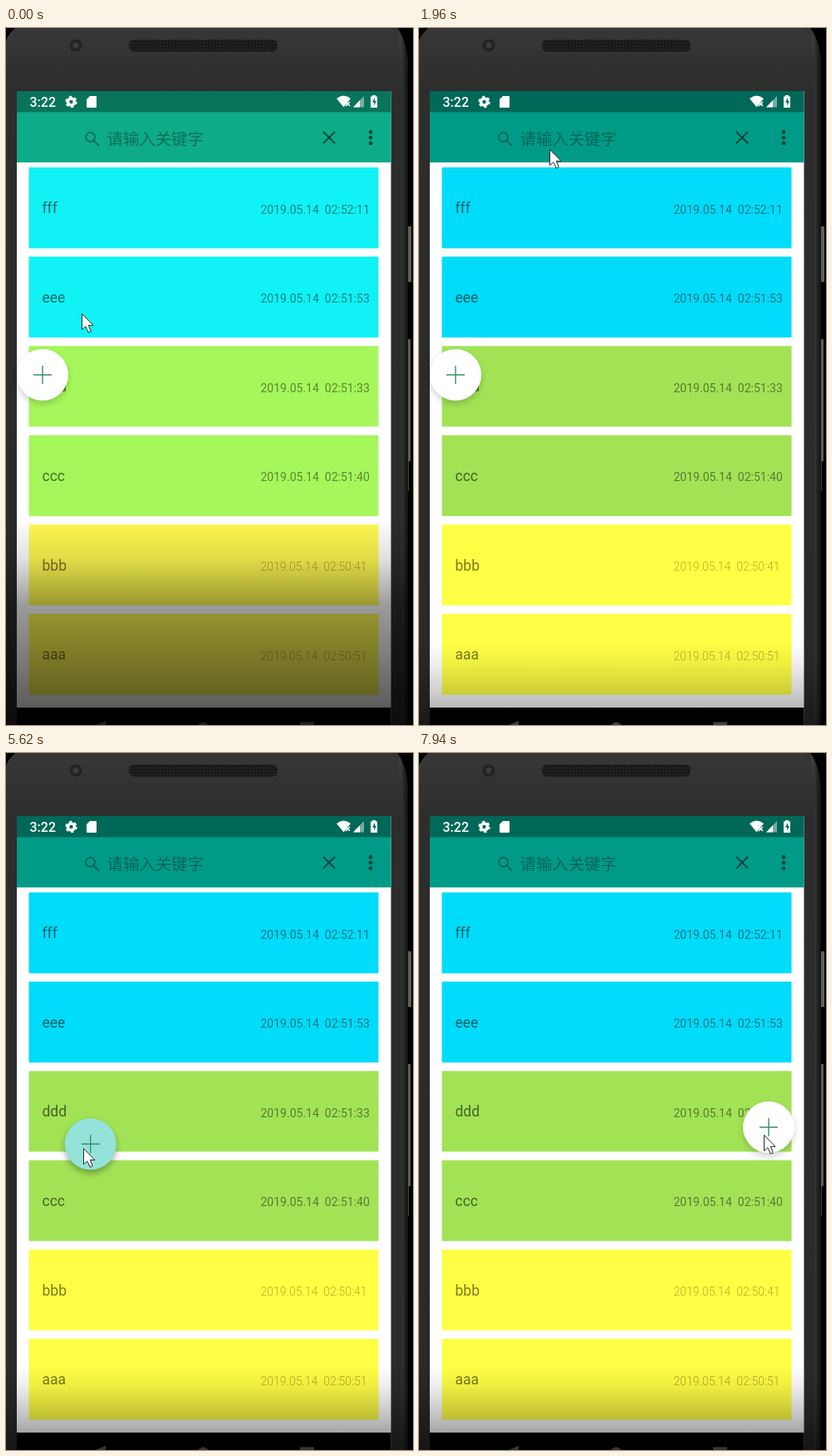
These frames come from a looping animation (490x840 px, 8 s). An HTML page:

```html
<!DOCTYPE html>
<html lang="zh">
<head>
<meta charset="utf-8">
<style>
html, body { margin: 0; width: 100%; height: 100%; overflow: hidden; background: #000; }
svg {
  display: block; width: 490px; height: 840px; font-family: Roboto, "Noto Sans CJK SC", "Noto Sans CJK", sans-serif;
  --status: #006858; --bar: #009b87; --cyan: #00dcf9; --green: #a2e356; --yellow: #ffff45;
}
svg.bright { --status: #08745a; --bar: #0eab88; --cyan: #10f2f5; --green: #a6f75b; --yellow: #fffa50; }
text { white-space: pre; }
.name { font-size: 17.5px; fill: rgba(0,0,0,.57); }
.date { font-size: 14px; fill: rgba(0,0,0,.46); }
.yellow ~ .name { fill: rgba(0,0,0,.52); }
.yellow ~ .date { fill: rgba(90,50,0,.42); font-weight: 300; }
.hint { font-size: 19.4px; fill: rgba(0,0,0,.35); font-family: "Noto Sans CJK SC", "Noto Sans CJK", sans-serif; }
.status { fill: var(--status); }
.bar { fill: var(--bar); }
.cyan { fill: var(--cyan); }
.green { fill: var(--green); }
.yellow { fill: var(--yellow); }
</style>
</head>
<body>
<svg id="stage" viewBox="0 0 490 840">
  <defs>
    <linearGradient id="body" x2="0" y2="1">
      <stop stop-color="#373737"/><stop offset=".09" stop-color="#2d2d2d"/><stop offset="1" stop-color="#292929"/>
    </linearGradient>
    <linearGradient id="rim">
      <stop stop-color="#2c2c2c"/><stop offset=".5" stop-color="#3c3c3c"/><stop offset="1" stop-color="#111"/>
    </linearGradient>
    <linearGradient id="deep" x2="0" y2="1">
      <stop stop-opacity="0"/><stop offset=".2" stop-opacity=".12"/><stop offset=".42" stop-opacity=".39"/>
      <stop offset=".8" stop-opacity=".58"/><stop offset="1" stop-opacity=".68"/>
    </linearGradient>
    <linearGradient id="low" x2="0" y2="1">
      <stop stop-opacity="0"/><stop offset=".25" stop-opacity=".07"/><stop offset=".6" stop-opacity=".24"/>
      <stop offset="1" stop-opacity=".48"/>
    </linearGradient>
    <pattern id="mesh" width="4" height="4" patternUnits="userSpaceOnUse">
      <rect width="4" height="4" fill="#191919"/><circle cx="2" cy="2" r="1" fill="#272727"/>
    </pattern>
    <filter id="blur" x="-50%" y="-50%" width="200%" height="200%"><feGaussianBlur stdDeviation="4"/></filter>
  </defs>

  <rect width="490" height="840"/>
  <path d="M484 239h4v67h-4zM484 375h3v147h-3z" fill="#59605e"/>
  <path d="M484 522h1v36h-1z" fill="#444"/>
  <path d="M12 0Q3 7 -2 22V840H484V48Q483 16 471 0Z" fill="url(#body)"/>
  <path d="M465 0Q476 18 476 48V840H484V48Q483 16 471 0Z" fill="url(#rim)"/>
  <path d="M12 0Q3 7 -2 22" fill="none" stroke="#484848"/>
  <circle cx="84" cy="21" r="7.5" fill="#232323"/><circle cx="84" cy="21" r="3.5" fill="#3c3c3c"/>
  <rect x="148" y="14" width="179" height="14.5" rx="6" fill="url(#mesh)"/>

  <rect x="13" y="76" width="450.5" height="764" fill="#fff"/>
  <rect class="status" x="13" y="76" width="450.5" height="26"/>
  <rect class="bar" x="13" y="101.5" width="450.5" height="60.5"/>
  <g fill="#fff">
    <text x="28.5" y="95" font-size="16" font-weight="500">3:22</text>
    <circle cx="78.5" cy="89" r="4" fill="none" stroke="#fff" stroke-width="3.6"/>
    <circle cx="78.5" cy="89" r="6" fill="none" stroke="#fff" stroke-width="2.4" stroke-dasharray="3.14"/>
    <path d="M101 82h7q1 0 1 1v12q0 1-1 1h-10q-1 0-1-1V86z"/>
    <path d="M398 85Q406.500 78 415 85L406.500 95.500Z"/>
    <path d="M431 82V95.500H418Z" opacity=".45"/><path d="M426 87.200V95.500H418Z"/>
    <path d="M441 81h4v1.500h2V96h-8V82.500h2z"/>
  </g>
  <path class="status" d="M409 89l5 5m0-5l-5 5" stroke="#fff" stroke-width="1.5"/>
  <path class="status" d="M444 84l-3 5.500h2v4l3-5.500h-2z"/>
  <g fill="none" stroke="#000" stroke-opacity=".34" stroke-width="2">
    <circle cx="101.500" cy="131.500" r="5.500"/><path d="M105.500 135.500L112 142"/>
  </g>
  <text class="hint" x="121.500" y="140.500">请输入关键字</text>
  <g stroke="#000" stroke-opacity=".55">
    <path d="M382 125l14 14m0-14l-14 14" stroke-width="2"/>
    <path d="M439 125.500v0m0 6.700v0m0 6.700v0" stroke-width="4.800" stroke-linecap="round"/>
  </g>

  <g id="rows"></g>

  <rect x="13" y="819" width="450.500" height="21"/>
  <path d="M108 840l12-5v5zM231 840q6.500-7 13 0zM354 836.500h17v3.500h-17z" fill="#686868"/>

  <g id="fab">
    <circle id="shade" cy="4" r="30.500" filter="url(#blur)"/>
    <circle id="disc" r="31"/>
    <path d="M-11 0H11M0-11V11" stroke="#3d8f66" stroke-width="1.400"/>
  </g>
  <rect id="deepShade" y="590" width="490" height="250" fill="url(#deep)"/>
  <rect id="lowShade" y="738" width="490" height="102" fill="url(#low)"/>
  <path id="cursor" d="M.5 .5V19.500L4.800 15.700L8.200 23L11.300 21.700L8.300 14.300H14Z" fill="#fff" stroke="#2a2a2a"/>
</svg>
<script>
const $ = id => document.getElementById(id);
const LOOP = 8000;

const rows = [
  ["fff", "52:11", "cyan"], ["eee", "51:53", "cyan"],
  ["ddd", "51:33", "green"], ["ccc", "51:40", "green"],
  ["bbb", "50:41", "yellow"], ["aaa", "50:51", "yellow"]
];
$("rows").innerHTML = rows.map(([name, time, tint], i) => `
  <g transform="translate(27.5 ${168 + i * 107.6})">
    <rect class="${tint}" width="421" height="97.4" rx="1"/>
    <text class="name" x="16" y="55.2">${name}</text>
    <text class="date" x="279" y="55.5">2019.05.14  02:${time}</text>
  </g>`).join("");

// Each move: start ms, end ms, then Bezier points after the current place
const cursorMoves = [
  [0, 0, [91, 344]],
  [790, 1330, [157, 146]],
  [2310, 2900, [360, 216]],
  [3130, 3540, [407, 450]],
  [4820, 5300, [40, 425]],
  [5470, 6200, [200, 640], [370, 270], [203, 286]],
  [6360, 7030, [57, 377]],
  [7120, 7120, [38, 394]],
  [7200, 7900, [94, 609], [334, 609], [415, 460]]
];
const fabMoves = [
  [0, 0, [44, 418]],
  [5470, 6200, [220, 640], [390, 270], [237.5, 303]],
  [6270, 6360, [185.5, 303]],
  [7120, 7120, [44, 385]],
  [7200, 7900, [100, 600], [340, 600], [421, 451]]
];

function ease(t, from, to) {
  if (t >= to) return 1;
  const p = Math.max(0, (t - from) / (to - from));
  return p * p * (3 - 2 * p);
}

function bezier(points, p) {
  if (points.length === 1) return points[0];
  const next = points.slice(1).map((b, i) => b.map((v, k) => points[i][k] + (v - points[i][k]) * p));
  return bezier(next, p);
}

function place(id, moves, t) {
  const pos = moves.reduce((at, [from, to, ...path]) =>
    t < from ? at : bezier([at, ...path], ease(t, from, to)), [0, 0]);
  $(id).setAttribute("transform", `translate(${pos})`);
}

function draw(now) {
  const t = now % LOOP;
  const held = t >= 5500 && t < 7900;
  const clear = ease(t, 790, 1250);
  $("stage").classList.toggle("bright", t < 790);
  place("fab", fabMoves, t);
  place("cursor", cursorMoves, t);
  $("cursor").style.opacity = t >= 4730 && t < 4820 ? 0 : 1;
  $("disc").style.fill = held ? "#94e3da" : "#fff";
  $("shade").style.opacity = held ? .35 : .2;
  $("deepShade").style.opacity = 1 - clear;
  $("lowShade").style.opacity = .2 * clear + .8 * ease(t, 1650, 2120);
  requestAnimationFrame(draw);
}
requestAnimationFrame(draw);
</script>
</body>
</html>
```
